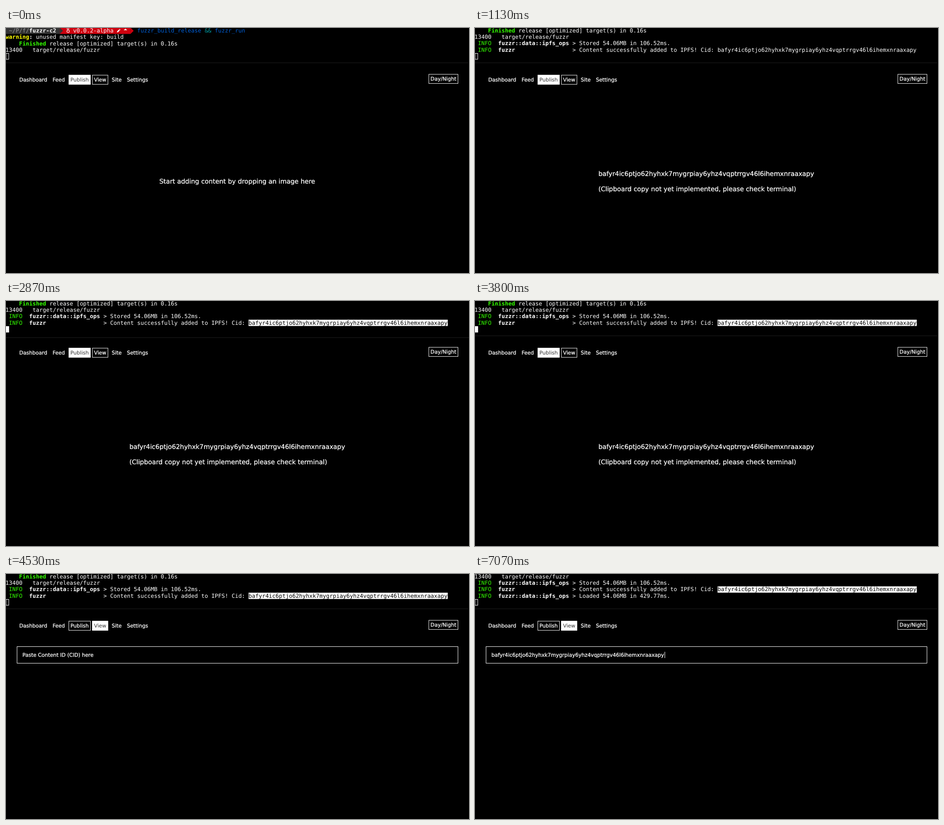
Write an HTML page that moves like this. It is 1028 px wide and 545 px high and loops after 8000 ms.

```html
<!DOCTYPE html>
<html lang="en">
<head>
<meta charset="utf-8">
<title>Publish and view</title>
<style>
  html, body { margin: 0; width: 100%; height: 100%; overflow: hidden; background: #000; }
  svg { display: block; width: 1028px; height: 545px; background: #000; }
  text { fill: currentColor; white-space: pre; text-rendering: geometricPrecision; }
  .mono { font: 12.444px "DejaVu Sans Mono", monospace; }
  .ui { font: 11.43px "DejaVu Sans", sans-serif; }
  .big { font: 14.29px "DejaVu Sans", sans-serif; }
  .ui, .big { stroke: currentColor; stroke-width: .3; }
  .thin { stroke: none; }
  .bold { font-weight: bold; }
  .box { fill: none; stroke: #fff; stroke-width: 1; }
</style>
</head>
<body>
<svg id="stage" viewBox="0 0 1028 545"></svg>
<script>
const LOOP = 8000;
const STORED = 1130, FOCUS = 2670, SELECT = 2870, BLUR = 3800, HOLLOW = 3870;
const HOVER = 4330, VIEW = 4470, CARET = 5330, PASTE = 5600, LOADED = 7070;
const LEFT = -0.9, COL = 7.492, ROW = 14.1;
const CID = "bafyr4ic6ptjo62hyhxk7mygrpiay6yhz4vqptrrgv46l6ihemxnraaxapy";
const GREEN = "#33ff00", BLUE = "#005fd7", RED = "#ce000f", GREY = "#333";

const stage = document.getElementById("stage");
const timed = [];

function add(parent, tag, attrs, content) {
  const el = document.createElementNS("http://www.w3.org/2000/svg", tag);
  for (const key in attrs) el.setAttribute(key, attrs[key]);
  if (content) el.textContent = content;
  parent.appendChild(el);
  return el;
}

// Shows an element only inside the given [from, to] spans.
function during(el, ...spans) {
  timed.push({ el, spans });
  return el;
}

const group = parent => add(parent, "g", {});
const fill = (parent, x, y, width, height, color = "#fff") =>
  add(parent, "rect", { x, y, width, height, fill: color });
const box = (parent, x, y, w, h) =>
  add(parent, "rect", { x: x + .5, y: y + .5, width: w - 1, height: h - 1, class: "box" });
const label = (parent, x, y, content, cls = "ui", color = "#fff") =>
  add(parent, "text", { x, y, class: cls, style: "color:" + color }, content);
const term = (parent, row, col, content, color = "#fff", bold = false) =>
  label(parent, LEFT + col * COL, 10.3 + row * ROW, content, bold ? "mono bold" : "mono", color);
const shape = (parent, d, attrs) => add(parent, "path", { d, ...attrs });
const arrow = (parent, x, color) =>
  shape(parent, `M${x} -0.8l7 7l-7 7z`, { fill: color });

// Terminal
const log = group(stage);

function prompt(g) {
  fill(g, 0, 0, 120, 13.2, GREY);
  fill(g, 119.5, 0, 157, 13.2, RED);
  arrow(g, 119.5, GREY);
  arrow(g, 276.4, RED);
  term(g, 0, 1, "~/P/f/", "#999");
  term(g, 0, 7, "fuzzr-c2", "#fff", true);
  shape(g, "M134.5 1.8H140.5M136 4.2H138.5Q140.6 4.6 140.6 7.4A2.7 2.7 0 1 1 137.9 4.6",
    { fill: "none", stroke: "#fff", "stroke-width": 1.2 });
  term(g, 0, 20, "v0.0.2-alpha");
  shape(g, "M246.3 9.8L246.9 7.2L250.6 3.5L252.6 5.5L248.9 9.2ZM251.2 2.9L252.2 1.9L254.2 3.9L253.2 4.9Z",
    { fill: "#fff" });
  shape(g, "M261.2 5L265.2 1.4L269.2 5Z", { fill: "#fff" });
  term(g, 0, 39, "fuzzr_build_release", BLUE);
  term(g, 0, 59, "&&", "#00959c");
  term(g, 0, 62, "fuzzr_run", BLUE);
}

function info(row, module, message) {
  const g = group(log);
  term(g, row, 1, "INFO", GREEN);
  term(g, row, 7, module, "#fff", true);
  term(g, row, 29, "> " + message);
  return g;
}

prompt(log);
term(log, 1, 0, "warning", "#ffff00", true);
term(log, 1, 7, ":", "#fff", true);
term(log, 1, 9, "unused manifest key: build");
term(log, 2, 4, "Finished", GREEN, true);
term(log, 2, 13, "release [optimized] target(s) in 0.16s");
term(log, 3, 0, "13400");
term(log, 3, 8, "target/release/fuzzr");
during(info(4, "fuzzr::data::ipfs_ops", "Stored 54.06MB in 106.52ms."), [STORED, LOOP]);

const added = during(info(5, "fuzzr", "Content successfully added to IPFS! Cid:"), [STORED, LOOP]);
during(term(added, 5, 72, CID), [STORED, SELECT]);
const picked = during(group(added), [SELECT, LOOP]);
fill(picked, 538.5, 41.6 + 2 * ROW, 442.3, 14);
term(picked, 5, 72, CID, "#000");

during(info(6, "fuzzr::data::ipfs_ops", "Loaded 54.06MB in 429.77ms."), [LOADED, LOOP]);

box(stage, -0.4, 56, 7, 14);
during(fill(stage, -0.4, 56, 7, 14), [FOCUS, HOLLOW]);
during(fill(stage, 0, 77, 1026, 1, "#1e1e1e"), [0, FOCUS], [BLUR, LOOP]);
during(fill(stage, 0, 81, 1028, 1, "#1e1e1e"), [FOCUS, BLUR]);

// Navigation
function tab(x, w, textX, name, from, to) {
  box(stage, x, 104.4, w, 21.4);
  during(label(stage, textX, 119, name), [0, from], [to, LOOP]);
  const on = during(group(stage), [from, to]);
  fill(on, x, 104.4, w, 21.4);
  label(on, textX, 119, name, "ui thin", "#333");
}

label(stage, 29.5, 119, "Dashboard");
label(stage, 103.6, 119, "Feed");
tab(139, 49, 143.1, "Publish", 0, VIEW);
tab(191.3, 35.5, 195.6, "View", HOVER, LOOP);
label(stage, 234.8, 119, "Site");
label(stage, 268.6, 119, "Settings");
box(stage, 938.3, 102.5, 65.7, 21.4);
label(stage, 942.6, 117.4, "Day/Night");

// Publish page
during(label(stage, 340.5, 346, "Start adding content by dropping an image here", "big"), [0, STORED]);
const done = during(group(stage), [STORED, VIEW]);
label(done, 273.9, 329.2, CID, "big");
label(done, 273.9, 362.5, "(Clipboard copy not yet implemented, please check terminal)", "big");

// View page
const view = during(group(stage), [VIEW, LOOP]);
box(view, 24, 161, 980, 38);
during(label(view, 36.6, 184, "Paste Content ID (CID) here"), [VIEW, PASTE]);
during(label(view, 36.6, 184, CID), [PASTE, LOOP]);
during(fill(view, 37, 173, 1, 14), [CARET, PASTE]);
during(fill(view, 421, 173, 1, 14), [PASTE, LOOP]);

function draw(t) {
  for (const { el, spans } of timed) {
    const on = spans.some(([from, to]) => t >= from && t < to);
    el.style.display = on ? "" : "none";
  }
  const scrolled = t < STORED ? 0 : t < LOADED ? 2 : 3;
  log.setAttribute("transform", `translate(0 ${-scrolled * ROW})`);
}

const start = performance.now();
function tick() {
  draw((performance.now() - start) % LOOP);
  requestAnimationFrame(tick);
}
tick();
</script>
</body>
</html>
```
